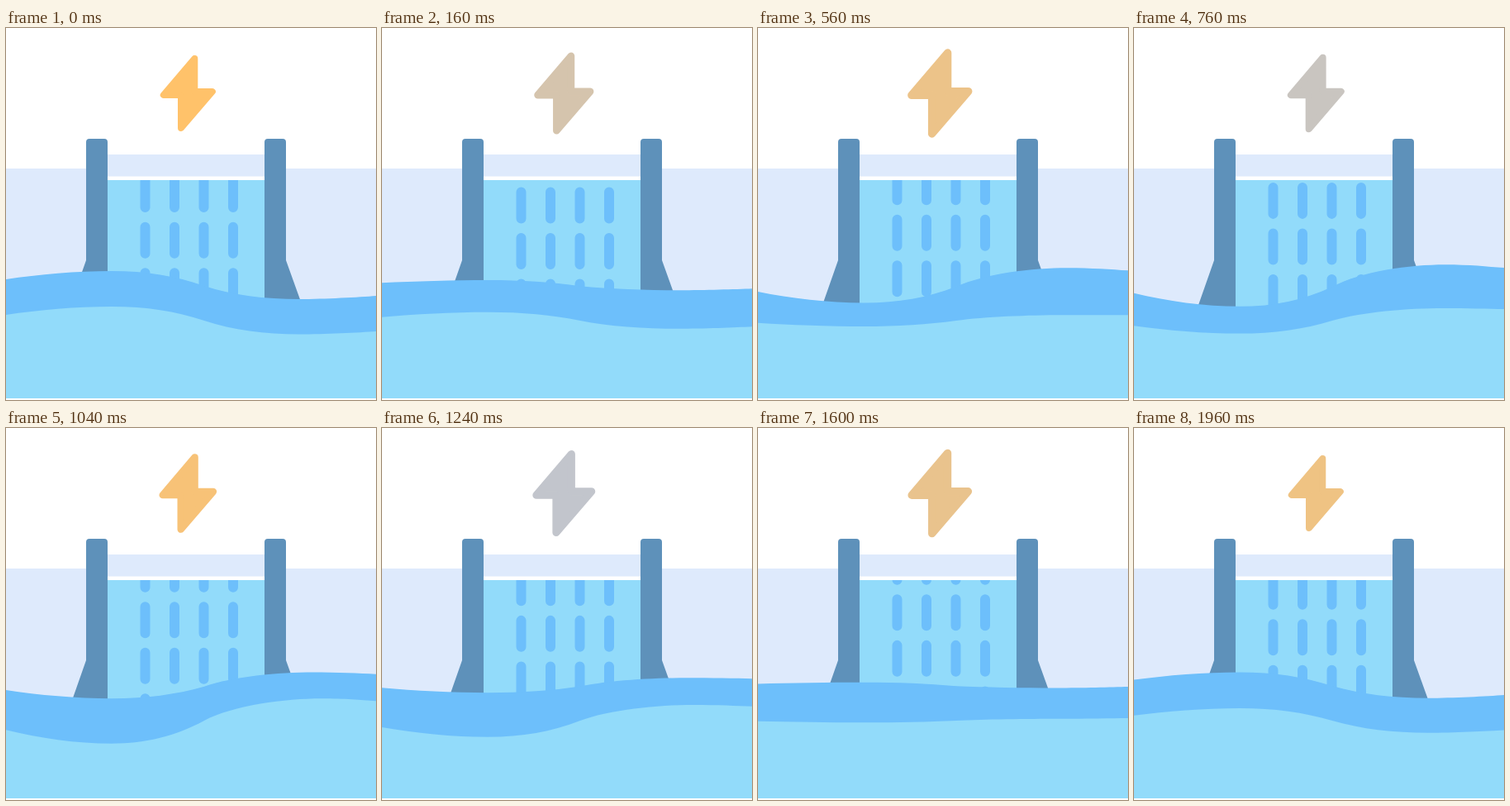
These frames come from a looping animation (448x450 px, 2 s). An HTML page:

```html
<!DOCTYPE html>
<html lang="en">
<head>
<meta charset="utf-8">
<title>Hydroelectric dam</title>
<style>
  html, body { margin: 0; width: 100%; height: 100%; overflow: hidden; background: #fff; }
  svg { display: block; width: 448px; height: 450px; }
  .pale { fill: #deeafc; }
  .water { fill: #92dbfa; }
  .deep { fill: #6dbffb; }
  .pillar { fill: #5e91ba; }
  #drops { stroke: #6dbffb; stroke-width: 12; stroke-linecap: round; stroke-dasharray: 32 23.55; }
  #bolt { stroke-width: 8; stroke-linejoin: round; }
</style>
</head>
<body>
<svg viewBox="0 0 448 450">
  <clipPath id="fall"><rect x="123" y="184" width="190" height="180"/></clipPath>
  <rect class="pale" y="170" width="448" height="200"/>
  <rect class="pale" x="123" y="153" width="190" height="27"/>
  <rect x="123" y="153" width="190" height="17" class="pale"/>
  <rect x="123" y="179.5" width="190" height="5" fill="#fff"/>
  <rect class="water" x="123" y="184" width="190" height="180"/>
  <g clip-path="url(#fall)"><g id="drops">
    <path d="M168.5 74V400"/><path d="M204 74V400"/>
    <path d="M239.5 74V400"/><path d="M275 74V400"/>
  </g></g>
  <path class="pillar" d="M123 345V138q0-4-4-4H101q-4 0-4 4V281L74.5 345Z"/>
  <path class="pillar" d="M313 345V138q0-4 4-4H335q4 0 4 4V281L362 345Z"/>
  <path id="back" class="deep"/>
  <path id="front" class="water"/>
  <path id="bolt" d="M228.3 37L190.8 81H212V121L249.8 77H228.3Z"/>
</svg>
<script>
  const LOOP = 2000, STEP = 40, DROP_GAP = 55.55;
  const $ = id => document.getElementById(id);
  const mix = (a, b, p) => a + (b - a) * p;

  // Linear value at time t through [time, value] pairs
  function track(t, keys) {
    const i = Math.max(1, keys.findIndex(k => k[0] > t));
    const [t0, v0] = keys[i - 1], [t1, v1] = keys[i];
    return mix(v0, v1, (t - t0) / (t1 - t0));
  }

  const boltHeight = [[0, 92], [475, 113], [860, 88], [1445, 113], [2000, 90.3]];
  const boltGrey = [0, 235, 485, 725, 1010, 1240, 1510, 1760, 2030].map((t, i) => [t, i % 2]);
  const backRise = [[0, 0], [667, 1], [2000, 0]];
  const frontRise = [[0, 0], [1060, 1], [2000, 0]];

  // Heights at the left edge, first bend, middle, second bend, right edge; then x of the second bend
  const backPoses = [[304, 294, 312, 328, 324, 355], [322, 340, 313, 283, 287.5, 378]];
  const frontPoses = [[347, 337, 354, 370.5, 367, 355], [365.5, 382.5, 354, 326.5, 329.5, 382]];

  function wave([from, to], p) {
    const [l, a, m, b, r, x] = from.map((v, i) => mix(v, to[i], p));
    return `M0 ${l}C40 ${mix(l, a, .6)} 85 ${a} 128 ${a}` +
      `C170 ${a} 205 ${mix(m, a, .68)} 240 ${m}` +
      `C275 ${mix(m, b, .7)} ${x - 42} ${b} ${x} ${b}` +
      `C${x + 30} ${b} 428 ${mix(r, b, .4)} 448 ${r}V448H0Z`;
  }

  const orange = [255, 194, 106], grey = [194, 197, 204];

  function draw(t) {
    $('drops').setAttribute('transform', `translate(0 ${t * DROP_GAP * 3 / LOOP % DROP_GAP})`);
    $('back').setAttribute('d', wave(backPoses, track(t, backRise)));
    $('front').setAttribute('d', wave(frontPoses, track(t, frontRise)));

    const scale = track(t, boltHeight) / 92, p = track(t, boltGrey);
    const color = `rgb(${orange.map((v, i) => Math.round(mix(v, grey[i], p)))})`;
    const bolt = $('bolt');
    bolt.setAttribute('transform', `translate(220.3 79) scale(${scale}) translate(-220.3 -79)`);
    bolt.setAttribute('fill', color);
    bolt.setAttribute('stroke', color);
  }

  const start = performance.now();
  function tick() {
    const t = (performance.now() - start) % LOOP;
    draw(Math.floor(t / STEP + .001) * STEP % LOOP);
    requestAnimationFrame(tick);
  }
  tick();
</script>
</body>
</html>
```
